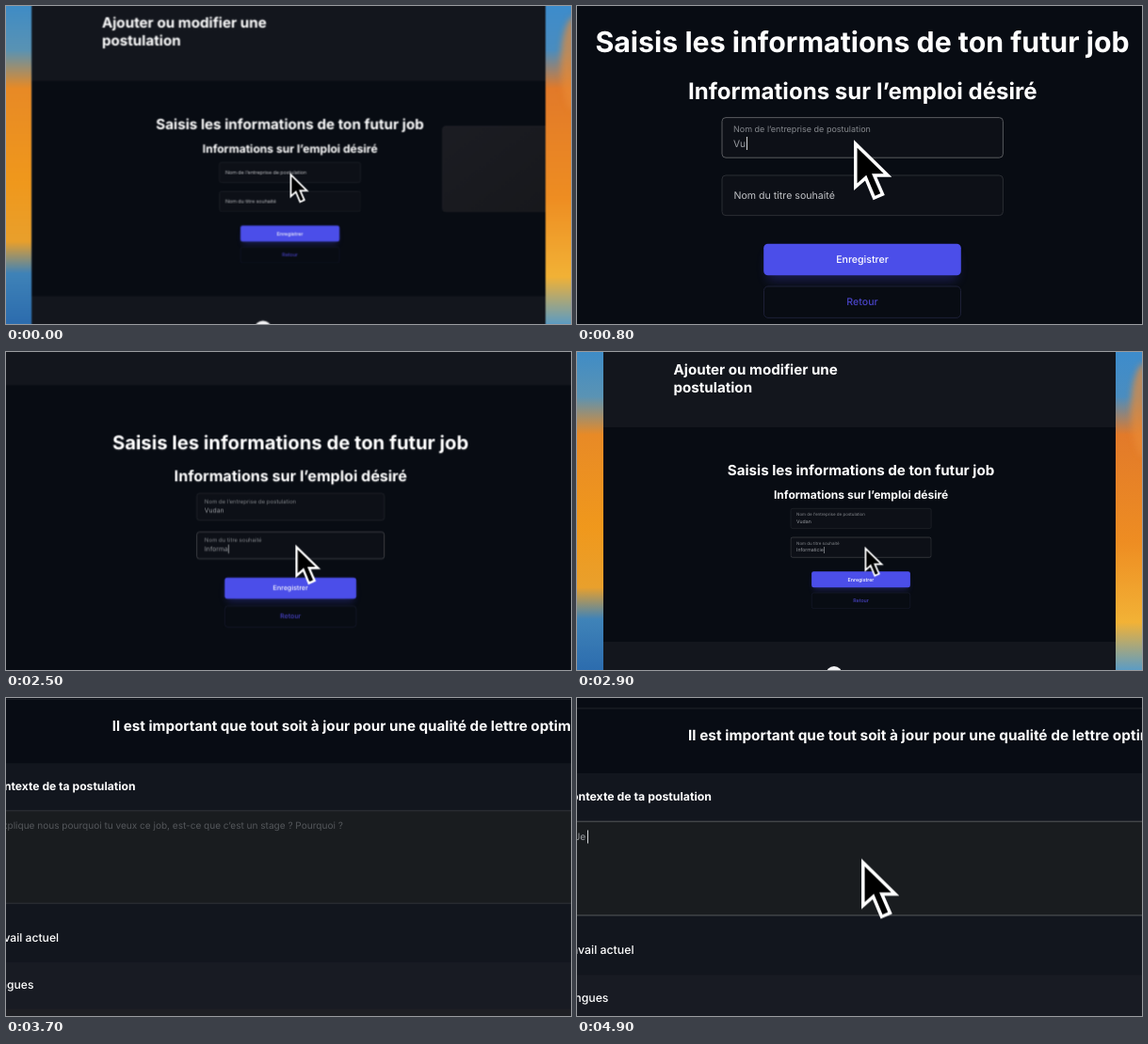
Recreate the animation shown at these times as an HTML page. Size 600x338 px, loop 5 s.

```html
<!DOCTYPE html>
<html lang="fr">
<head>
<meta charset="utf-8">
<title>Postulation</title>
<style>
html, body { margin: 0; width: 100%; height: 100%; overflow: hidden; background: #080c13; }
svg { display: block; width: 600px; height: 338px; }
text { font-family: Inter, "Open Sans", sans-serif; text-rendering: geometricPrecision; fill: #fff; }
.h1 { font-size: 30.3px; font-weight: 700; }
.h2 { font-size: 24.1px; font-weight: 700; }
.h3 { font-size: 15.4px; font-weight: 650; }
.btn { font-size: 10.6px; font-weight: 500; }
.row { font-size: 12.3px; font-weight: 550; }
.mid { text-anchor: middle; }
.end { text-anchor: end; }
.value { font-size: 10.3px; fill: #9a9da2; }
.caret { fill: #d5d7da; }
.box { fill: #0d1017; stroke: #2b2e34; }

.anim, .label { animation: 5s linear infinite; }
.cam { animation-name: cam; }
.cursor { animation-name: cursor; }
.toast { animation-name: toast; }
.form { animation-name: form; }
.detail { animation-name: detail; }
.focus1 { animation-name: focus1; }
.focus2 { animation-name: focus2; }
.focus3 { animation-name: focus3; }
.save { animation-name: save; }
.back { animation-name: back; }
.label { font-size: 10.6px; fill: #c0c2c6; }
.label1 { animation-name: label1; }
.label2 { animation-name: label2; }

@keyframes cam {
  0% { transform: translate(150px, 107px) scale(.5); animation-timing-function: cubic-bezier(.333, .91, .667, 1); }
  16% { transform: translate(0, 0) scale(1); }
  46% { transform: translate(0, 0) scale(1); animation-timing-function: cubic-bezier(.333, .91, .667, 1); }
  58% { transform: translate(150px, 107px) scale(.5); }
  65% { transform: translate(150px, 107px) scale(.5); animation-timing-function: cubic-bezier(.333, .91, .667, 1); }
  77% { transform: translate(-52.6px, -89.6px) scale(1); }
  85% { transform: translate(-52.6px, -89.6px) scale(1); animation-timing-function: ease-out; }
  92%, 100% { transform: translate(-44px, -75.6px) scale(1); }
}
@keyframes cursor {
  0% { transform: translate(303px, 140.5px); animation-timing-function: ease-in-out; }
  12% { transform: translate(294px, 142px); }
  28% { transform: translate(294px, 142px); animation-timing-function: ease-in-out; }
  35% { transform: translate(311px, 199.5px); }
  60% { transform: translate(311px, 199.5px); animation-timing-function: ease-in-out; }
  67% { transform: translate(357.7px, 258px); }
  73.9% { transform: translate(357.7px, 258px); visibility: visible; }
  74% { transform: translate(357.7px, 258px); visibility: hidden; }
  85% { transform: translate(357.7px, 258px); visibility: hidden; animation-timing-function: ease-out; }
  92%, 100% { transform: translate(346px, 246px); visibility: visible; }
}
@keyframes toast {
  0% { transform: none; animation-timing-function: ease-in; }
  8%, 100% { transform: translate(230px, 0); }
}
@keyframes form { 0%, 73.9% { opacity: 1; } 73.91%, 100% { opacity: 0; } }
@keyframes detail { 0%, 73.9% { opacity: 0; } 73.91%, 100% { opacity: 1; } }
@keyframes focus1 {
  0%, 8% { stroke: #2b2e34; }
  10%, 34% { stroke: #585a5e; }
  36%, 100% { stroke: #2b2e34; }
}
@keyframes focus2 {
  0%, 35% { stroke: #2b2e34; }
  37%, 100% { stroke: #585a5e; }
}
@keyframes focus3 {
  0%, 88% { stroke: #303338; }
  92%, 100% { stroke: #55585b; }
}
@keyframes label1 {
  0%, 8% { transform: translate(166.5px, 143.6px); fill: #c0c2c6; }
  11%, 100% { transform: translate(166px, 134px) scale(.85); fill: #85888d; }
}
@keyframes label2 {
  0%, 34.5% { transform: translate(166.5px, 204.6px); fill: #c0c2c6; }
  37.5%, 100% { transform: translate(166px, 195.2px) scale(.85); fill: #85888d; }
}
@keyframes save {
  0%, 63% { fill: #4b4ee9; }
  67%, 100% { fill: #3a37e3; }
}
@keyframes back {
  0%, 62% { fill: #4b45e0; fill-opacity: 0; }
  66%, 69% { fill: #4b45e0; fill-opacity: .2; }
  73%, 100% { fill: #4b45e0; fill-opacity: 0; }
}
</style>
</head>
<body>
<svg viewBox="0 0 600 338">
  <defs>
    <linearGradient id="left" x2="0" y2="1">
      <stop offset="0" stop-color="#3f8cc6"/>
      <stop offset=".14" stop-color="#5a93b4"/>
      <stop offset=".26" stop-color="#e88a26"/>
      <stop offset=".55" stop-color="#f0981c"/>
      <stop offset=".74" stop-color="#e9a02c"/>
      <stop offset=".84" stop-color="#3f83b8"/>
      <stop offset="1" stop-color="#2c6cae"/>
    </linearGradient>
    <linearGradient id="right" x2="0" y2="1">
      <stop offset="0" stop-color="#3d8ccc"/>
      <stop offset=".14" stop-color="#4a8dc0"/>
      <stop offset=".26" stop-color="#e27a2a"/>
      <stop offset=".6" stop-color="#ee8d22"/>
      <stop offset=".85" stop-color="#f2b236"/>
      <stop offset="1" stop-color="#5c9cc4"/>
    </linearGradient>
    <linearGradient id="panel" x2="1" y2="1">
      <stop offset="0" stop-color="#1c1d23"/>
      <stop offset="1" stop-color="#17181c"/>
    </linearGradient>
    <filter id="glow" x="-20%" y="-60%" width="140%" height="240%">
      <feGaussianBlur stdDeviation="6"/>
    </filter>
  </defs>

  <g class="anim cam">
    <g class="anim form">
      <rect x="-320" y="-400" width="1300" height="1100" fill="#080c13"/>
      <rect x="-320" y="-400" width="1300" height="346" fill="#13161d"/>
      <rect x="-320" y="402" width="1300" height="300" fill="#13161d"/>
      <circle cx="246" cy="472" r="18" fill="#f2f2f4"/>
      <text class="h1" x="-95" y="-167">Ajouter ou modifier une</text>
      <text class="h1" x="-95" y="-128">postulation</text>
      <text class="h1 mid" x="303" y="48.6">Saisis les informations de ton futur job</text>
      <text class="h2 mid" x="303.3" y="98.6">Informations sur l’emploi désiré</text>

      <rect class="box anim focus1" x="154" y="118.6" width="298.4" height="42.6" rx="4"/>
      <text class="label label1">Nom de l’entreprise de postulation</text>
      <text class="value" id="v1" x="166" y="149.6"></text>
      <rect class="caret" id="c1" y="139" width="1" height="14"/>

      <rect class="box anim focus2" x="154" y="180" width="298.4" height="42.6" rx="4"/>
      <text class="label label2">Nom du titre souhaité</text>
      <text class="value" id="v2" x="166" y="210.6"></text>
      <rect class="caret" id="c2" y="200" width="1" height="14"/>

      <rect x="202" y="262" width="202" height="30" rx="5" fill="#4b4ee9" opacity=".27" filter="url(#glow)"/>
      <rect class="anim save" x="198.2" y="252.7" width="209.6" height="33.6" rx="4.5" fill="#4b4ee9"/>
      <text class="btn mid" x="303" y="273.2">Enregistrer</text>
      <rect x="198.5" y="298" width="209" height="33.4" rx="4.5" fill="#080c13"/>
      <rect class="anim back" x="198.5" y="298" width="209" height="33.4" rx="4.5" stroke="#1d2036"/>
      <text class="btn mid" x="303" y="318.2" style="fill:#4a44c8">Retour</text>

      <rect class="anim toast" x="626" y="42" width="240" height="181" rx="6" fill="url(#panel)" stroke="#2a2b30"/>

      <rect x="-330" y="-300" width="86" height="850" fill="#3f8cc6"/>
      <rect x="-330" y="-214" width="86" height="676" fill="url(#left)"/>
      <rect x="844" y="-300" width="86" height="850" fill="#3d8ccc"/>
      <rect x="844" y="-214" width="86" height="676" fill="url(#right)"/>
      <ellipse cx="906" cy="-90" rx="30" ry="100" fill="#e98a35" opacity=".7" filter="url(#glow)"/>
    </g>

    <g class="anim detail" opacity="0">
      <g transform="translate(44 75.6)">
        <rect x="-200" y="-200" width="1000" height="700" fill="#080c14"/>
        <rect x="-200" y="10.5" width="1000" height="1" fill="#20242b"/>
        <text class="h3" x="118" y="45.2">Il est important que tout soit à jour pour une qualité de lettre optimale</text>
        <rect x="-200" y="80" width="1000" height="265" fill="#12161e"/>
        <text class="row end" x="143" y="109.2" style="font-weight:650">Contexte de ta postulation</text>
        <rect class="anim focus3" x="-200" y="131.2" width="1000" height="99.8" fill="#191c1f" stroke="#303338"/>
        <text class="end" id="hint" x="366.5" y="151" style="font-size:10.2px;fill:#54575b">Explique nous pourquoi tu veux ce job, est-ce que c’est un stage ? Pourquoi ?</text>
        <text class="value end" id="v3" x="9.3" y="151"></text>
        <rect class="caret" id="c3" x="11" y="140.5" width="1" height="14"/>
        <text class="row end" x="60.5" y="272.4">Travail actuel</text>
        <rect x="-200" y="294.5" width="1000" height="51" fill="#181b23"/>
        <text class="row end" x="33.5" y="323.4">Langues</text>
        <rect x="-200" y="345" width="1000" height="155" fill="#1e1f24"/>
      </g>
    </g>

    <g class="anim cursor">
      <path d="M1.8 4.4V50.2L12.6 40.6L21.5 62L30.5 58L21.7 37.9H36Z" fill="#000" stroke="#fff" stroke-width="3.5"/>
    </g>
  </g>
</svg>
<script>
const $ = id => document.getElementById(id);
const LOOP = 5000;

const typed = (text, start, step, t) =>
  t < start ? "" : text.slice(0, Math.floor((t - start) / step) + 1);

const show = (el, on) => el.setAttribute("visibility", on ? "visible" : "hidden");

function field(n, text, caretOn) {
  const value = $("v" + n), caret = $("c" + n);
  if (value.textContent !== text) value.textContent = text;
  caret.setAttribute("x", 166.8 + (text ? value.getComputedTextLength() : 0));
  show(caret, caretOn);
}

function draw(t) {
  field(1, typed("Vudan", 690, 100, t), t > 550 && t < 1750);
  field(2, typed("Informaticien", 1995, 80, t), t > 1990);
  const writing = t >= 4880;
  $("v3").textContent = writing ? "Je" : "";
  show($("c3"), writing);
  show($("hint"), !writing);
}

let origin;
function tick(now) {
  origin ??= now;
  draw((now - origin) % LOOP);
  requestAnimationFrame(tick);
}
draw(0);
requestAnimationFrame(tick);
</script>
</body>
</html>
```
